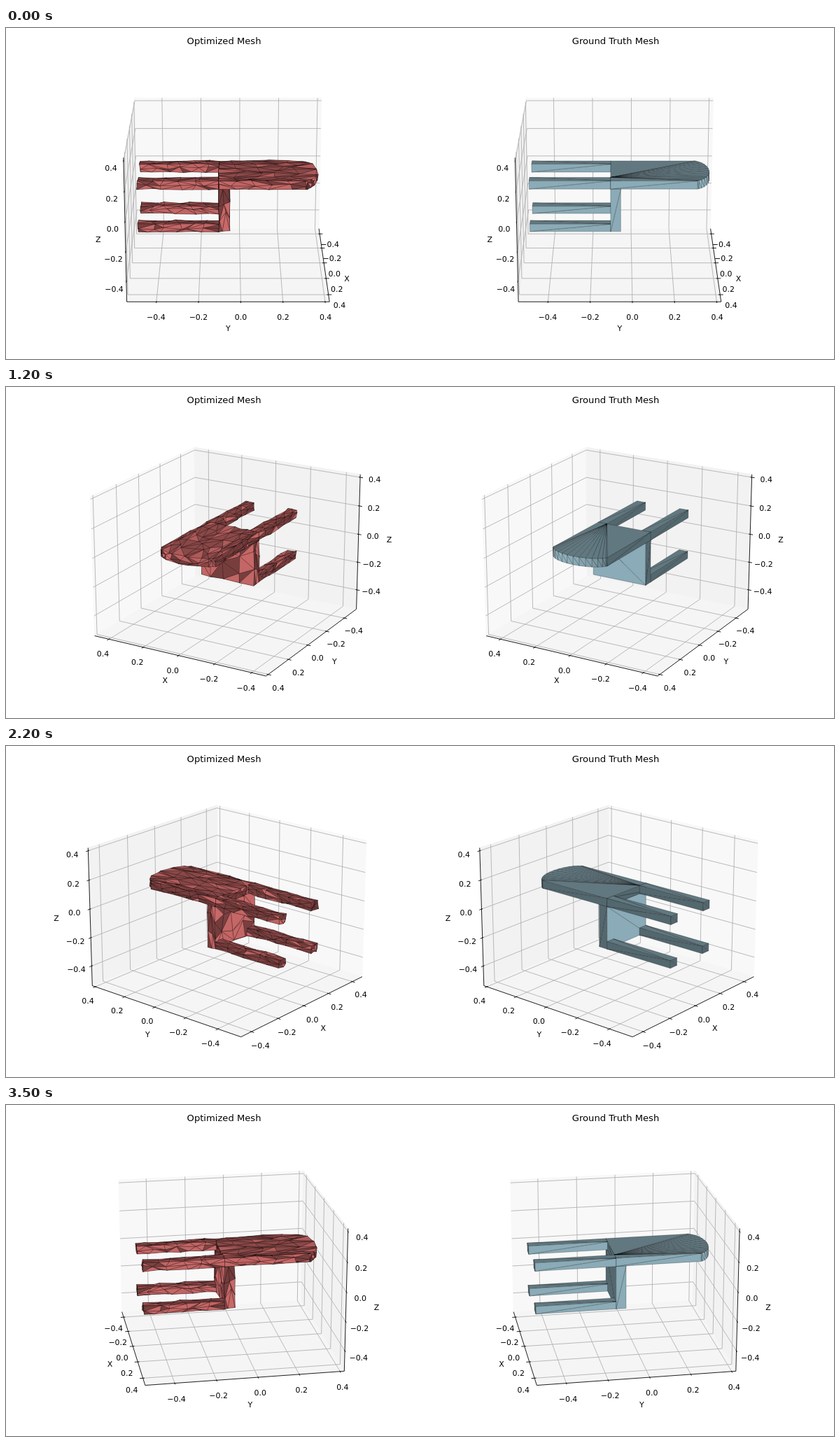
An HTML page with a canvas for the animation above (3600 ms loop, 1183 by 473 pixels).

```html
<!DOCTYPE html>
<html lang="en">
<head>
<meta charset="utf-8">
<title>Mesh comparison</title>
<style>
html, body { margin: 0; width: 100%; height: 100%; overflow: hidden; background: #fff; }
canvas { display: block; width: 1183px; height: 473px; }
</style>
</head>
<body>
<canvas id="stage" width="1183" height="473"></canvas>
<script>
const ctx = document.getElementById('stage').getContext('2d');
const LOOP = 3600, STEP = 100;

// camera
const ELEV = 20 * Math.PI / 180, DIST = 10, ZOOM = 2334, OY = 239.65;
const SE = Math.sin(ELEV), CE = Math.cos(ELEV);

// half sizes of the axes box, and data-to-box mapping per axis
const A = 0.5952, C = 0.4464;
const HALF = [A, A, C];
const SCALE = [1.2388, 1.2388, 0.9291];
const MID = [0.004, -0.0597, -0.0605];
const TICKS = [-0.4, -0.2, 0, 0.2, 0.4];
const NAMES = ['X', 'Y', 'Z'];
const PANES = ['#f8f8f8', '#f2f2f2', '#f5f5f5'];
const FONT = '"DejaVu Sans", Verdana, sans-serif';
const EM = 10.95;

// chair sizes in box units
const W = 0.1855, INNER = 0.124, FOOT = -0.5435, SEAT0 = -0.055, SEAT1 = 0.006;
const ARC = 0.466, RISE = 0.078, TOP = 0.162, UNDER = 0.110;
const LOW0 = -0.163, LOW1 = -0.115;
const LIGHT = [-2 / 3, -2 / 3, 1 / 3];

const lerp = (a, b, t) => a + (b - a) * t;

function noise(p, k) {
  const [x, y, z] = p.map(v => Math.round(v * 1e4));
  const s = Math.sin(x * 0.1271 + y * 0.3117 + z * 0.7471 + k * 19.19) * 43758.5453;
  return s - Math.floor(s);
}

const swing = (p, k) => noise(p, k) * 2 - 1;

function triangle(p, rear) {
  const [a, b, c] = p;
  const u = b.map((v, i) => v - a[i]), v = c.map((q, i) => q - a[i]);
  const n = [u[1] * v[2] - u[2] * v[1], u[2] * v[0] - u[0] * v[2], u[0] * v[1] - u[1] * v[0]];
  const len = Math.hypot(...n) || 1;
  // the normals point inwards, so the lit side is turned around
  const lit = -(n[0] * LIGHT[0] + n[1] * LIGHT[1] + n[2] * LIGHT[2]) / len;
  return { p, lit, rear };
}

// surface of a mapped unit cube, cut into n cells along each axis
function cube(map, n, rough, skip) {
  const out = [];
  // slide inner vertices along the surface, then shake them a little
  const shake = q => {
    const seed = map(q);
    const slid = q.map((t, i) => t > 0 && t < 1 ? t + swing(seed, i + 4) * 0.42 / n[i] : t);
    return map(slid).map((v, i) => v + swing(seed, i + 1) * rough);
  };
  const put = (p, rear) => {
    const tri = triangle(p, rear);
    if (rough && noise(p[1], 9) > 0.76) tri.lit *= -1; // folded over
    out.push(tri);
  };
  for (let d = 0; d < 3; d++) {
    if (d === skip) continue;
    const a = (d + 1) % 3, b = (d + 2) % 3;
    for (const side of [0, 1]) {
      const cut = rough || side ? n : [1, 1, 1];
      const rear = d === 1 && !side;
      const at = (i, j) => {
        const q = [0, 0, 0];
        q[d] = side; q[a] = i / cut[a]; q[b] = j / cut[b];
        return rough ? shake(q) : map(q);
      };
      for (let i = 0; i < cut[a]; i++) for (let j = 0; j < cut[b]; j++) {
        let q = [at(i, j), at(i + 1, j), at(i + 1, j + 1), at(i, j + 1)];
        if (!side) q.reverse();
        if (rough && noise(q[0], 7) > 0.5) q = [q[1], q[2], q[3], q[0]];
        put([q[0], q[1], q[2]], rear);
        put([q[0], q[2], q[3]], rear);
      }
    }
  }
  return out;
}

const block = (lo, hi) => q => q.map((t, i) => lerp(lo[i], hi[i], t));

function rim(x) {
  const q = x / W;
  return ARC + RISE * (Math.sqrt(1 - 0.933 * q * q) - 0.2588) / 0.7412;
}

const backMap = q => {
  const x = -W * Math.cos(Math.PI * q[0]);
  return [x, lerp(SEAT0, rim(x), q[1]), lerp(UNDER, TOP, q[2])];
};

// flat top and underside of the back, fanned from one corner each
function fans(n) {
  const line = [[W, SEAT0]];
  for (let i = 0; i <= n; i++) {
    const x = W * Math.cos(Math.PI * i / n);
    line.push([x, rim(x)]);
  }
  line.push([-W, SEAT0]);
  const out = [];
  for (let i = 0; i + 1 < line.length; i++) {
    const put = (x, z, s) => {
      const p = [[x, SEAT0, z], [...line[i], z], [...line[i + 1], z]];
      out.push(triangle(s ? p : p.reverse()));
    };
    put(INNER, TOP, true);
    put(-INNER, UNDER, false);
  }
  return out;
}

function chair(rough) {
  const legCut = rough ? [2, 6, 2] : [1, 1, 1];
  const leg = (sx, z0, z1) => {
    const x0 = sx > 0 ? INNER : -W, x1 = sx > 0 ? W : -INNER;
    return cube(block([x0, FOOT, z0], [x1, SEAT0, z1]), legCut, rough);
  };
  const pair = (z0, z1) => ({ '1': leg(1, z0, z1), '-1': leg(-1, z0, z1) });
  return {
    legs: [pair(LOW0, LOW1), pair(UNDER, TOP)],
    seat: cube(block([-W, SEAT0, LOW0], [W, SEAT1, UNDER]), rough ? [4, 2, 3] : [1, 1, 1], rough),
    back: rough
      ? cube(backMap, [10, 5, 2], rough)
      : cube(backMap, [14, 1, 1], 0, 2).concat(fans(14))
  };
}

const plots = [
  { title: 'Optimized Mesh', tx: 311.5, ox: 317.4, base: [246, 128, 128], rough: 0.0045, edge: 'rgba(0,0,0,.8)' },
  { title: 'Ground Truth Mesh', tx: 871, ox: 876.9, base: [173, 214, 229], rough: 0, edge: 'rgba(0,0,0,.75)' }
];
plots.forEach(p => { p.mesh = chair(p.rough); });

function camera(deg, ox) {
  const az = deg * Math.PI / 180, c = Math.cos(az), s = Math.sin(az);
  const project = ([x, y, z]) => {
    const f = x * c + y * s;
    const depth = DIST - f * CE - z * SE;
    return [ox + (y * c - x * s) / depth * ZOOM, OY - (z * CE - f * SE) / depth * ZOOM, depth];
  };
  return {
    project,
    near: [c >= -1e-9 ? 1 : -1, s >= -1e-9 ? 1 : -1, -1],
    eyeY: DIST * CE * s
  };
}

function trace(cam, pts, close) {
  ctx.beginPath();
  pts.forEach(p => { const q = cam.project(p); ctx.lineTo(q[0], q[1]); });
  if (close) ctx.closePath();
}

function drawLine(cam, pts, color) {
  trace(cam, pts);
  ctx.strokeStyle = color;
  ctx.lineWidth = 0.876;
  ctx.stroke();
}

function drawText(str, x, y, size) {
  ctx.font = size + 'px ' + FONT;
  ctx.fillStyle = '#000';
  ctx.fillText(str, x, y);
}

function drawAxes(cam) {
  const [nx, ny] = cam.near;
  const far = [-nx * A, -ny * A, -C];
  const open = [nx * A, ny * A, C];
  const at = (p, i, v) => { const q = p.slice(); q[i] = v; return q; };

  for (let i = 0; i < 3; i++) {
    const a = (i + 1) % 3, b = (i + 2) % 3;
    const p = at(far, a, open[a]), q = at(far, b, open[b]);
    trace(cam, [far, p, at(p, b, open[b]), q], true);
    ctx.fillStyle = ctx.strokeStyle = PANES[i];
    ctx.lineWidth = 0.8;
    ctx.fill();
    ctx.stroke();
  }

  const place = (t, i) => (t - MID[i]) * SCALE[i];
  for (let i = 0; i < 3; i++) {
    const a = (i + 1) % 3, b = (i + 2) % 3;
    for (const t of TICKS) {
      const m = at(far, i, place(t, i));
      drawLine(cam, [at(m, a, open[a]), m, at(m, b, open[b])], '#b0b0b0');
    }
  }

  const edges = [[0, ny * A, -C], [nx * A, 0, -C], [nx * A, -ny * A, 0]];
  const tickDir = [1, 0, 0];
  edges.forEach((edge, i) => {
    const d = tickDir[i];
    // push a point away from the box centre, in units of its padding
    const outward = (p, k) => p.map((v, j) => j === i ? v : v + Math.sign(edge[j]) * k * HALF[j] * 0.16);
    drawLine(cam, [at(edge, i, -HALF[i]), at(edge, i, HALF[i])], '#000');
    const name = cam.project(outward(edge, 1.522));
    drawText(NAMES[i], name[0], name[1] + 0.275 * EM, EM);
    for (const t of TICKS) {
      const p = at(edge, i, place(t, i));
      drawLine(cam, [at(p, d, p[d] * 1.032), at(p, d, p[d] * 0.984)], '#000');
      const q = cam.project(outward(p, 0.7));
      drawText(t.toFixed(1).replace('-', '\u2212'), q[0], q[1] + 0.76 * EM, EM);
    }
  });
}

function drawPart(cam, plot, part, flip) {
  const list = [];
  for (const tri of part) {
    const [a, b, c] = tri.p.map(cam.project);
    const area = (b[0] - a[0]) * (c[1] - a[1]) - (b[1] - a[1]) * (c[0] - a[0]);
    if (!plot.rough && area >= 0) continue;
    list.push({ a, b, c, depth: a[2] + b[2] + c[2], lit: flip && tri.rear ? -tri.lit : tri.lit });
  }
  list.sort((p, q) => q.depth - p.depth);
  ctx.lineWidth = 0.32;
  for (const { a, b, c, lit } of list) {
    const k = 0.64 + 0.237 * lit;
    ctx.fillStyle = `rgb(${plot.base.map(v => Math.round(v * k)).join()})`;
    ctx.beginPath();
    ctx.moveTo(a[0], a[1]);
    ctx.lineTo(b[0], b[1]);
    ctx.lineTo(c[0], c[1]);
    ctx.closePath();
    ctx.fill();
    ctx.strokeStyle = plot.edge;
    ctx.stroke();
  }
}

function drawChair(cam, plot) {
  const { legs, seat, back } = plot.mesh;
  const nx = cam.near[0];
  const drawLegs = () => legs.forEach(pair => [-nx, nx].forEach(s => drawPart(cam, plot, pair[s])));
  const drawBody = () => {
    drawPart(cam, plot, seat, plot.rough || nx < 0);
    drawPart(cam, plot, back);
  };
  if (cam.eyeY > SEAT0) { drawLegs(); drawBody(); }
  else { drawBody(); drawLegs(); }
}

function render(step) {
  ctx.fillStyle = '#fff';
  ctx.fillRect(0, 0, 1183, 473);
  ctx.textAlign = 'center';
  ctx.lineJoin = 'round';
  for (const plot of plots) {
    const cam = camera(step * 10, plot.ox);
    drawAxes(cam);
    drawChair(cam, plot);
    drawText(plot.title, plot.tx, 23, 13.14);
  }
}

const start = performance.now();
let shown = -1;
function tick(now) {
  const step = Math.floor(Math.max(0, now - start) % LOOP / STEP);
  if (step !== shown) render(shown = step);
  requestAnimationFrame(tick);
}
tick(start);
</script>
</body>
</html>
```
